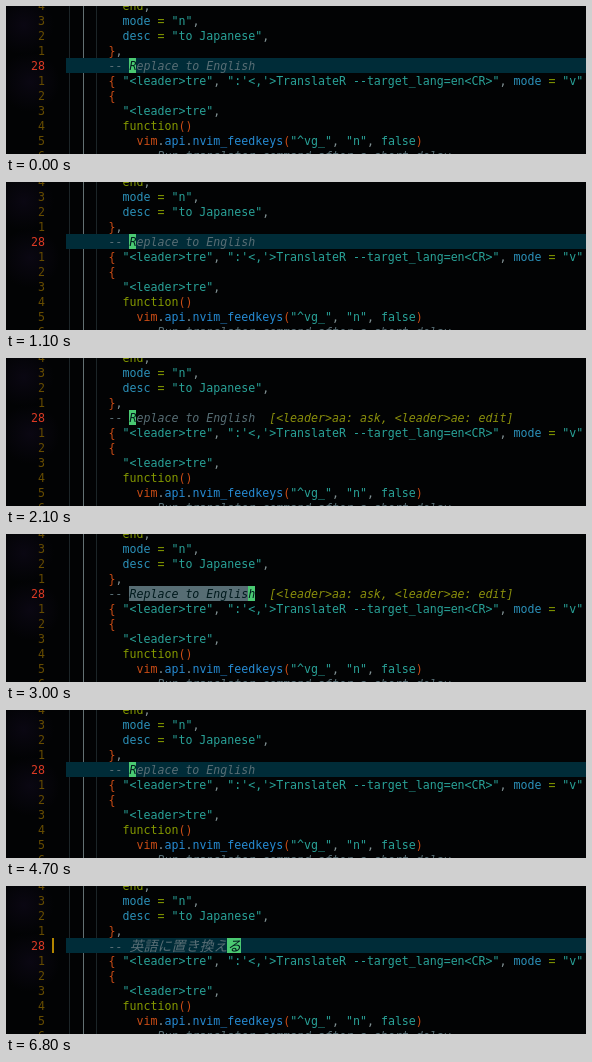
Write an HTML page that moves like this. It is 580 px wide and 148 px high and loops after 6900 ms.

```html
<!DOCTYPE html>
<html lang="en">
<head>
<meta charset="utf-8">
<title>Editor: translate a comment</title>
<style>
  html, body { margin: 0; width: 100%; height: 100%; overflow: hidden; background: #020304; }
  #stage {
    position: relative; width: 580px; height: 148px; overflow: hidden;
    font: 11.6px/15px "DejaVu Sans Mono", "Noto Sans CJK JP", "Noto Sans CJK", monospace;
    color: #839395;
    background:
      radial-gradient(circle at 18px 19px, #0a0712, transparent 30px),
      radial-gradient(circle at 24px 76px, #0a0712, transparent 30px);
  }
  #stage div { position: absolute; }
  .row { left: 0; width: 580px; height: 15px; white-space: pre; }
  .row > * { position: absolute; top: 0; }
  .num { right: 541px; color: #664c00; }
  .current .num { color: #db3a24; }
  .guide { top: 0; width: 1px; height: 148px; background: #1c2528; }
  .guide.scope { background: #637072; }
  #line, #sign, #selection, #cursor { top: 52px; height: 15px; }
  #line { left: 60px; width: 520px; background: #002c38; }
  #sign { left: 46px; width: 2px; background: #b28500; }
  #selection { background: #576d74; }
  #cursor { background: #4ac972; }
  .field { color: #2b90b8; }
  .str { color: #29a298; }
  .brace { color: #c94c16; }
  .key { color: #849900; }
  .fn { color: #268bd3; }
  .note, .hint { font-style: italic; }
  .note { color: #576d74; }
  .hint { color: #8a8f0c; }
  .under { color: #001a1d; }
  .wide { font-size: 14px; }
</style>
</head>
<body>
<div id="stage">
  <div class="guide" style="left:63px"></div>
  <div class="guide scope" style="left:77px"></div>
  <div class="guide" style="left:90px"></div>
  <div id="line"></div>
  <div id="sign"></div>
  <div id="selection"></div>
  <div id="cursor"></div>
</div>
<script>
const LOOP = 6900, CELL = 6.984, LEFT = 102.6, ROW = 15, TOP = 53;
const ENGLISH = "Replace to English", JAPANESE = "英語に置き換える";
const HINT = "  [<leader>aa: ask, <leader>ae: edit]";
const $ = id => document.getElementById(id);
const column = n => LEFT + n * CELL;

// [row relative to the current line, number, indent, [class, text]...]
const rows = [
  [-4, 4, 2, ["key", "end"], ["", ","]],
  [-3, 3, 2, ["field", "mode"], ["key", " = "], ["str", '"n"'], ["", ","]],
  [-2, 2, 2, ["field", "desc"], ["key", " = "], ["str", '"to Japanese"'], ["", ","]],
  [-1, 1, 0, ["brace", "}"], ["", ","]],
  [0, 28, 0],
  [1, 1, 0, ["brace", "{ "], ["str", '"<leader>tre"'], ["", ", "],
    ["str", "\":'<,'>TranslateR --target_lang=en<CR>\""], ["", ", "],
    ["field", "mode"], ["key", " = "], ["str", '"v"']],
  [2, 2, 0, ["brace", "{"]],
  [3, 3, 2, ["str", '"<leader>tre"'], ["", ","]],
  [4, 4, 2, ["key", "function"], ["brace", "()"]],
  [5, 5, 4, ["brace", "vim"], ["", "."], ["fn", "api"], ["", "."],
    ["fn", "nvim_feedkeys"], ["brace", "("], ["str", '"^vg_"'], ["", ", "],
    ["str", '"n"'], ["", ", "], ["str", "false"], ["brace", ")"]],
  [6, 6, 4, ["note", "-- Run translator command after a short delay"]],
];

// start time, mode, cursor position within the comment text
const steps = [
  [0, "normal", 0],
  [1500, "visual", 0],
  [2300, "visual", 6],
  [2600, "visual", 9],
  [2900, "visual", 17],
  [4600, "normal", 0],
  [5200, "done", 7],
];

function span(parent, cls, text) {
  const el = document.createElement("span");
  el.className = cls;
  el.textContent = text;
  parent.append(el);
  return el;
}

function addRow([offset, number, indent, ...parts]) {
  const row = document.createElement("div");
  row.className = offset ? "row" : "row current";
  row.style.top = TOP + offset * ROW + "px";
  span(row, "num", number);
  const code = span(row, "", "");
  code.style.left = column(indent) + "px";
  for (const [cls, text] of parts) span(code, cls, text);
  $("stage").append(row);
  return code;
}

const codes = rows.map(addRow);
const comment = codes[rows.findIndex(row => row[0] === 0)];

function place(el, from, to) {
  const left = Math.floor(column(from));
  el.style.left = left + "px";
  el.style.width = Math.floor(column(to)) - left + "px";
}

function show([, mode, at]) {
  const done = mode === "done", visual = mode === "visual";
  const text = done ? JAPANESE : ENGLISH;
  const size = done ? 2 : 1;
  const wide = done ? " wide" : "";
  const start = 3 + at * size;
  $("line").hidden = visual;
  $("sign").hidden = !done;
  place($("selection"), 3, visual ? start : 3);
  place($("cursor"), start, start + size);

  comment.replaceChildren();
  span(comment, "note", "-- ");
  span(comment, (visual ? "note under" : "note") + wide, text.slice(0, at));
  span(comment, "note under" + wide, text[at]);
  span(comment, "note" + wide, text.slice(at + 1));
  if (visual) span(comment, "hint", HINT);
}

let shown;
function frame() {
  const time = performance.now() % LOOP;
  const step = steps.findLast(([start]) => start <= time);
  if (step !== shown) show(shown = step);
  requestAnimationFrame(frame);
}
frame();
</script>
</body>
</html>
```
